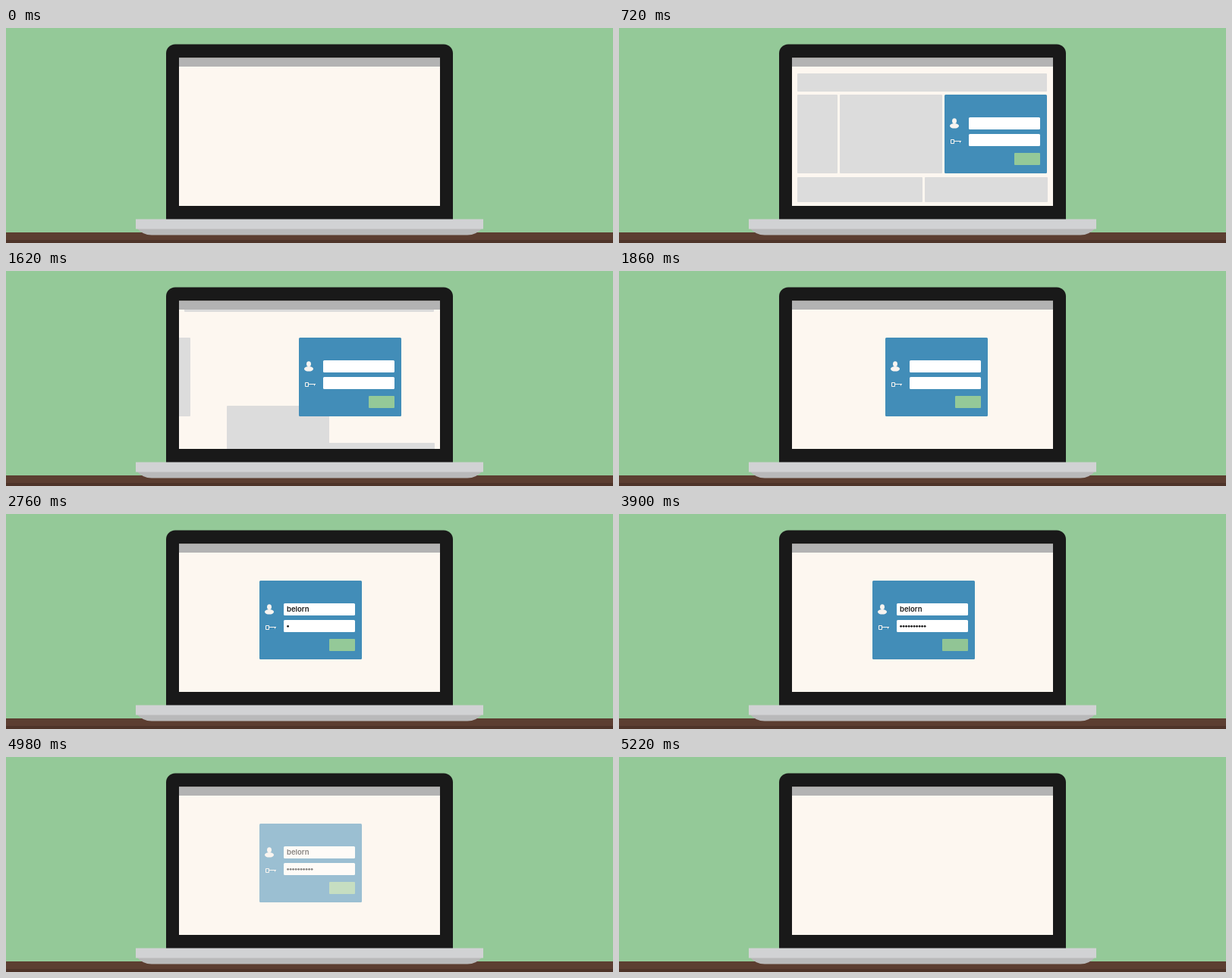
An HTML page for the animation above (5640 ms loop, 800x284 px).

```html
<!DOCTYPE html>
<html lang="en">
<head>
<meta charset="utf-8">
<title>Login on a laptop</title>
<style>
  html, body { margin: 0; width: 100%; height: 100%; overflow: hidden; background: #94c998; }
  svg { display: block; width: 800px; height: 284px; }
  text { font: 600 9.5px Inter, "Open Sans", sans-serif; fill: #1c1c1c; }
</style>
</head>
<body>
<svg viewBox="0 0 800 284">
  <defs>
    <clipPath id="view"><rect x="228" y="51" width="344" height="184"/></clipPath>
  </defs>
  <rect width="800" height="284" fill="#94c998"/>
  <rect y="270" width="800" height="14" fill="#5c3e31"/>
  <rect y="280" width="800" height="4" fill="#4e3429"/>
  <path d="M211 254V33.5a12 12 0 0 1 12-12H577a12 12 0 0 1 12 12V254z" fill="#191919"/>
  <rect x="228" y="39.5" width="344" height="195.5" fill="#fdf7f0"/>
  <rect x="228" y="39.5" width="344" height="11.5" fill="#b3b3b3"/>
  <path d="M172 264Q180 273.5 192 273.5H608Q620 273.5 628 264z" fill="#b9b9ba"/>
  <rect x="171" y="252.5" width="458" height="13" fill="#d1d2d4"/>

  <g clip-path="url(#view)">
    <g id="page">
      <g id="blocks" fill="#dcdcdc"></g>
      <g id="panel">
        <rect y="88" width="135" height="104" rx="1.5" fill="#428db8"/>
        <g fill="#f8f4f0">
          <ellipse cx="13" cy="122.8" rx="3" ry="3.5"/>
          <ellipse cx="13" cy="129.3" rx="6" ry="3.3"/>
        </g>
        <path d="M8.5 147.5h4v5h-4zM12.5 149.5H22M20.5 149v2.5" fill="none" stroke="#f8f4f0"/>
        <rect x="32" y="118" width="94" height="16" rx="1.5" fill="#fff"/>
        <rect x="32" y="140" width="94" height="16" rx="1.5" fill="#fff"/>
        <text id="user" x="36" y="129"></text>
        <g id="dots" fill="#1c1c1c"></g>
        <rect x="92" y="165" width="34" height="16" rx="1" fill="#94c998"/>
        <rect id="press" x="92" y="165" width="34" height="16" rx="1" fill="#000" opacity="0"/>
      </g>
    </g>
  </g>
</svg>
<script>
const LOOP = 5640, STEP = 60;
const NAME = "belorn", DOTS = 10;
const $ = id => document.getElementById(id);
const clamp = v => Math.min(1, Math.max(0, v));
const span = (t, a, b) => clamp((t - a) / (b - a));

function add(parent, tag, attrs) {
  const el = document.createElementNS("http://www.w3.org/2000/svg", tag);
  for (const k in attrs) el.setAttribute(k, attrs[k]);
  return parent.appendChild(el);
}

// x, y, width, height, then the shift per step when leaving
const blocks = [
  [235, 60, 329, 24, 0, -6],
  [235, 88, 53, 104, -9, 0],
  [291, 88, 135, 104, 0, 18],
  [235, 197, 165, 33, 0, 8.5],
  [403, 197, 162, 33, 0, 6]
].map(([x, y, width, height, dx, dy]) => ({
  el: add($("blocks"), "rect", { x, y, width, height, rx: 1 }), dx, dy
}));

const dots = Array.from({ length: DOTS }, (_, i) =>
  add($("dots"), "circle", { cx: 37.6 + 3.5 * i, cy: 148.3, r: 1.4 }));

// time, darkness of the button
const pressKeys = [[0, 0], [3900, 0.02], [3960, 0.12], [4080, 0.06], [4140, 0]];

function draw(t) {
  const fadeIn = 1 - (1 - span(t, 60, 720)) ** 2;
  const fadeOut = span(t, 4380, 5220) ** 2.2;
  $("page").setAttribute("opacity", fadeIn * (1 - fadeOut));

  const slide = span(t, 1320, 1980);
  const steps = slide * 11;
  $("panel").setAttribute("transform", `translate(${Math.round(429 - 95 * slide)} 0)`);
  for (const { el, dx, dy } of blocks) {
    el.setAttribute("transform", `translate(${dx * steps} ${dy * steps})`);
    el.setAttribute("visibility", slide < 1 ? "visible" : "hidden");
  }

  const letters = Math.floor((t - 2340) / STEP) + 1;
  $("user").textContent = NAME.slice(0, Math.max(0, letters));
  dots.forEach((dot, i) =>
    dot.setAttribute("visibility", t >= 2760 + Math.floor(i * 200 / 3) ? "visible" : "hidden"));

  $("press").setAttribute("opacity", pressKeys.filter(k => k[0] <= t).pop()[1]);
}

const start = performance.now();
function tick() {
  const t = (performance.now() - start) % LOOP;
  draw(Math.floor(t / STEP) * STEP);
  requestAnimationFrame(tick);
}
tick();
</script>
</body>
</html>
```
